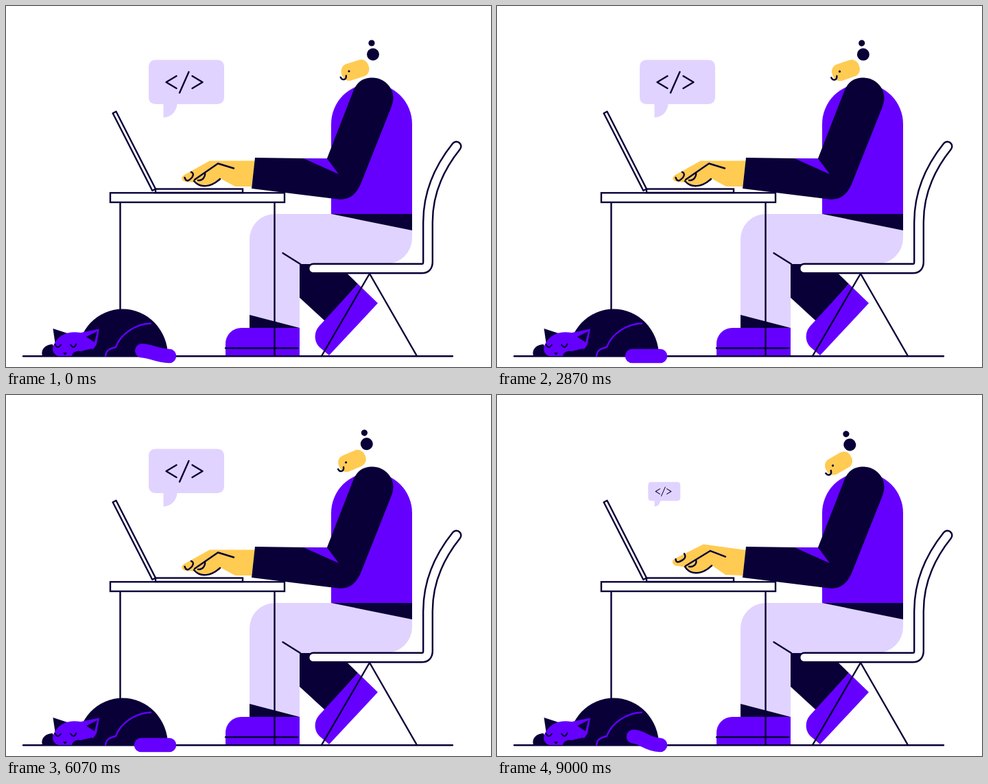
Animation of 707 by 526 pixels, one loop 9.07 s. Source, as an HTML page:

```html
<!DOCTYPE html>
<html lang="en">
<head>
<meta charset="utf-8">
<title>Coding at a desk</title>
<style>
  html, body { margin: 0; width: 100%; height: 100%; overflow: hidden; background: #fff; }
  svg { display: block; width: 100%; height: 100%; }
  .navy { fill: #080037; }
  .purple { fill: #6500ff; }
  .lilac { fill: #e1d3ff; }
  .skin { fill: #ffcb52; }
  .line { fill: none; stroke: #080037; stroke-width: 2.4; stroke-linecap: round; stroke-linejoin: round; }
  .sheet { fill: #fff; stroke: #080037; stroke-width: 2.4; }
  .chair { fill: none; stroke: #080037; stroke-width: 16; stroke-linecap: round; }
  .chair.inner { stroke: #fff; stroke-width: 11.2; }
</style>
</head>
<body>
<svg viewBox="0 0 707 526">
  <g id="legs">
    <path class="navy" d="M428 376H483L513 405L465 459L428 425Z"/>
    <path class="purple" d="M513 405L542 433L471 509L458 498C448 489 449 475 456 467Z"/>
    <path class="lilac" d="M392 303H474L592 327V338A38 38 0 0 1 554 376H428V469L355 450V340A37 37 0 0 1 392 303Z"/>
    <path class="navy" d="M355 450L428 469H355Z"/>
    <path class="purple" d="M320 510V492A23 23 0 0 1 343 469H428V510Z"/>
    <path class="line" d="M320 498.5H425M403.500 360L429 376"/>
  </g>

  <g id="torso">
    <path class="purple" d="M474 303V172A59 59 0 0 1 592 172V303Z"/>
    <path class="navy" d="M474 303H592V327Z"/>
  </g>

  <g id="seat">
    <path class="line" d="M460 510L530 390L599 510"/>
    <path class="chair" d="M448 382.500H606Q615 382.500 615 373V315C615 270 632 235 656.500 204.500"/>
    <path class="chair inner" d="M448 382.500H606Q615 382.500 615 373V315C615 270 632 235 656.500 204.500"/>
  </g>

  <g id="desk">
    <path class="line" d="M166.500 286V510M391.500 286V510M25 510.300H651"/>
    <rect class="sheet" x="152" y="272.300" width="254" height="13.700"/>
    <rect class="sheet" x="218" y="266.600" width="127" height="5.400"/>
    <path class="sheet" stroke-linejoin="round" d="M155.700 156.300L160.500 153.800L218 266.500L213.300 269Z"/>
  </g>

  <g id="hand">
    <path id="palm" class="skin"/>
    <path id="fingers" class="line"/>
  </g>
  <g id="arm">
    <path class="navy" d="M468 222L507 122C514 107 524 104.500 535 104.500C552 105 565 119 564.500 135Q564 142 561 149L518 257C512 273 501 283.500 484 281.500L358 266L363 221L468 222.500Z"/>
    <path class="purple" d="M434 222.300L468 222.300L485 245Z"/>
  </g>

  <g id="face">
    <rect class="skin" x="-20.500" y="-12.500" width="41" height="25" rx="11" transform="rotate(-18)"/>
    <circle class="navy" cx="-9" cy="1.500" r="1.600"/>
    <path class="line" d="M-21.300 10.300C-19 15.500-12.500 14.500-13.200 8"/>
  </g>
  <g id="bun" class="navy">
    <circle r="9"/>
    <circle cx="-2" cy="-16.500" r="4.600"/>
  </g>

  <g id="bubble">
    <path class="lilac" d="M219 78.500H307Q318 78.500 318 89.500V132Q318 143 307 143H249.500C248.500 154 241 162 229.500 162.500V143H219Q208 143 208 132V89.500Q208 78.500 219 78.500Z"/>
    <path class="line" d="M248.500 102L233.500 111L248.500 120M266.500 96L253 126.500M271.500 102L286.500 111L271.500 120"/>
  </g>

  <g id="cat">
    <path class="navy" d="M104 510A66 68.500 0 0 1 236 510Z"/>
    <path class="line" style="stroke:#6500ff" d="M145 510C146 501 152 499 160 497C167 478 189 463 211 462.500"/>
    <path class="navy" d="M53 510C50 500 58 493 68 493L74 510Z"/>
    <path class="navy" d="M68.500 470L93 478L72 494Z"/>
    <path class="purple" d="M71 491C78 478 92 473 109 476L136 470.500L132 493C125 504 118 510 108 510H76C66 506 67 497 71 491Z"/>
    <path class="navy" d="M117 482L133 474L129 490Z"/>
    <path class="navy" d="M96 510C97 504 103 502 109 503L126 499V510Z"/>
    <path class="line" style="stroke-width:2" d="M71.500 493Q75 501 80 493.500M94 493.500Q99 501 102.500 492.500"/>
    <path class="navy" d="M83 505H89L86 509Z"/>
    <path id="tail" fill="none" stroke="#6500ff" stroke-width="20.500" stroke-linecap="round"/>
  </g>
</svg>

<script>
  const LOOP = 9070, CYCLE = 3500, TYPING_START = 1165;
  const el = id => document.getElementById(id);

  // Each pair holds the resting and the raised outline of one part.
  const shapes = {
    palm: [
      "M363 225.5 L297 225.5 L260 246 C253 250 257 256 263 256 L275 257 C283 266 298 264 312 251 L334 263 L358 263 Z",
      "M363 226 L301 217.5 L260 238 C252 242 257 249 263 249 L275 251 C283 261 298 262 313 248 L333 262 L358 263 Z"],
    fingers: [
      "M260.5 250 C263 257 266 255 271 250 C274 246 273 243 270 242 M332 236.5 L309 229.5 L275 253 M274 255 C283 266 299 264 312 252 M280 254 C287 255 291 248 290 243",
      "M260.5 239 C261 246 266 243 271 240 C275 238 275 234 273 231 M333 235.5 L311 227 L275 249 M274 250 C281 262 298 263 313 248.5 M280 250 C287 251 292 246 290 240"],
    tail: [
      "M197 510 C207 510 221 510 238 510",
      "M201.5 482 C219 482 212 508 238 510"]
  };

  const ease = (p, from, to) => {
    const x = Math.min(1, Math.max(0, (p - from) / (to - from)));
    return (1 - Math.cos(Math.PI * x)) / 2;
  };
  const pulse = (p, a, b, c, d) => ease(p, a, b) - ease(p, c, d);
  const mix = (a, b, k) => a + (b - a) * k;

  function morph(id, k) {
    const [rest, raised] = shapes[id];
    const goal = raised.match(/[\d.]+/g);
    let i = 0;
    el(id).setAttribute("d", rest.replace(/[\d.]+/g, n => mix(+n, +goal[i++], k).toFixed(2)));
  }

  const place = (id, x, y, turn) =>
    el(id).setAttribute("transform", `translate(${x} ${y}) rotate(${turn})`);

  function draw(time) {
    const p = (time % LOOP - TYPING_START + CYCLE) % CYCLE;

    const stroke = 0.75 + 0.25 * Math.cos((p - 305) / 180 * 2 * Math.PI);
    const lift = pulse(p, 0, 150, 850, 1050) * stroke;
    morph("palm", lift);
    morph("fingers", lift);

    morph("tail", pulse(p, 380, 620, 690, 960) + pulse(p, 2265, 2465, 2520, 2760));

    const nod = 1 - pulse(p, 850, 1850, 3050, 3300);
    const bob = 1.5 * pulse(p, 300, 600, 850, 1100);
    place("face", mix(509, 498, nod), mix(93.5, 99.5, nod), -12 * nod);
    place("bun", mix(535, 512.8, nod) + bob, mix(70.5, 72.5, nod), -12 * nod);

    const size = pulse(p, 700, 1000, 2790, 3190);
    el("bubble").setAttribute("transform",
      `translate(229.5 162.5) scale(${size}) translate(-229.5 -162.5)`);
  }

  const start = performance.now();
  function tick() {
    draw(performance.now() - start);
    requestAnimationFrame(tick);
  }
  tick();
</script>
</body>
</html>
```
